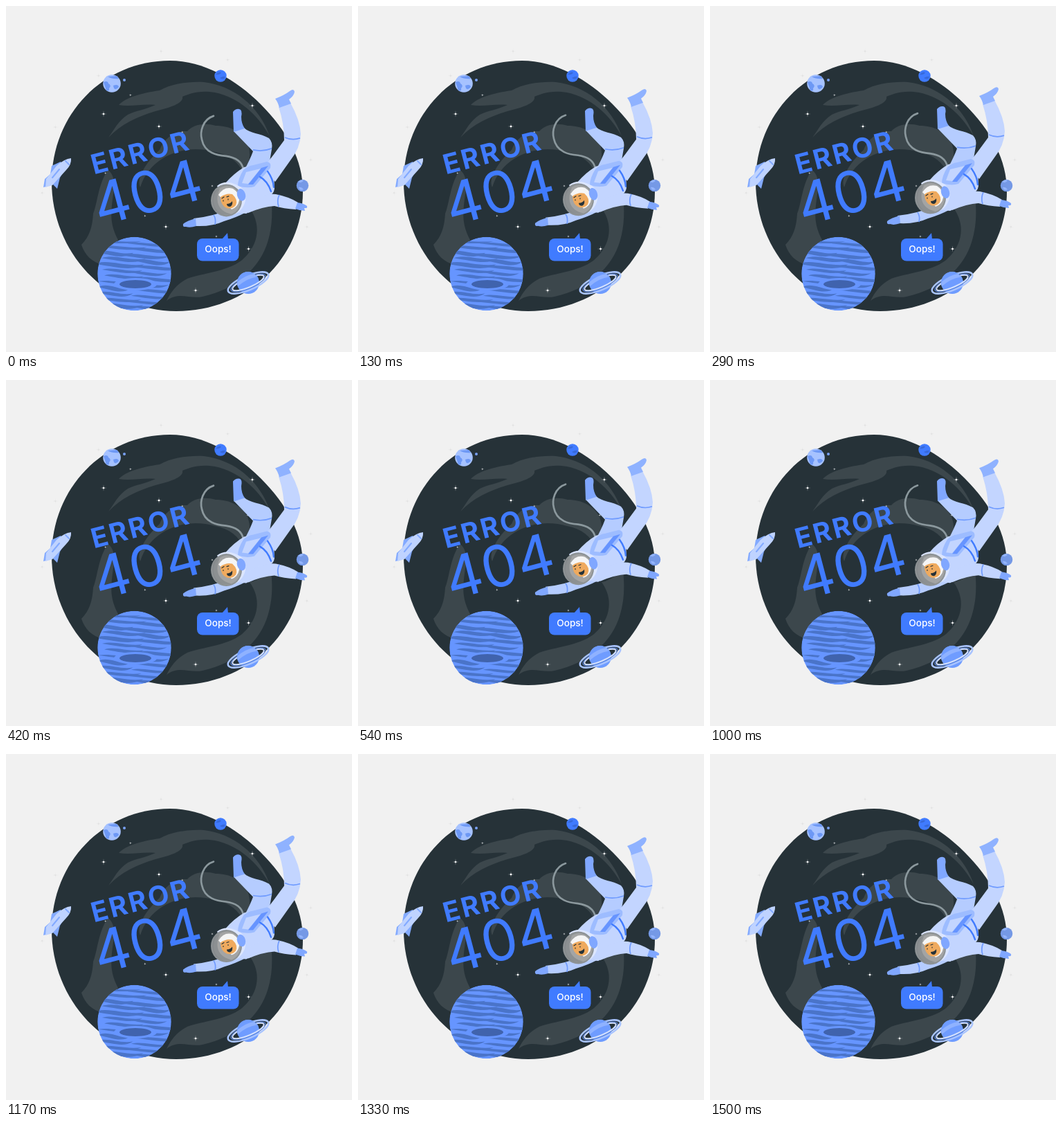
An HTML page that plays this animation: 500x500 px, repeating every 1.54 s.

```html
<!DOCTYPE html>
<html lang="en">
<head>
<meta charset="utf-8">
<title>Error 404</title>
<style>
  html, body { margin: 0; width: 100%; height: 100%; overflow: hidden; background: #f1f1f1; }
  svg { display: block; width: 100%; height: 100%; }
  text { font-family: Inter, "Open Sans", sans-serif; }
  .line { fill: none; stroke-linecap: round; }
  .cuff { fill: none; stroke: #6f9bff; stroke-width: 1.7; }
  .suit { fill: #c3d5ff; }
  .shade { fill: #b5ccff; }
  .glove { fill: #80a7ff; }
</style>
</head>
<body>
<svg viewBox="0 0 500 500">
  <defs>
    <clipPath id="globe"><circle cx="185.5" cy="387" r="53.3"/></clipPath>
  </defs>

  <!-- sky -->
  <path fill="#263238" d="M237 79C285 79 332 106 368 142C406 180 429 222 429 268C429 365 348 441 246 441C144 441 66 355 66 254C66 157 140 79 237 79Z"/>
  <g fill="#3c474c">
    <path d="M148 190C157 178 161 167 176 157C188 151 201 150 216 143C198 141 180 146 163 143C172 133 194 126 222 122C240 112 264 109 286 110C328 115 366 144 381 188C364 157 336 132 302 125C279 121 264 127 255 131C257 141 236 147 216 152C190 160 167 170 148 190Z"/>
    <path d="M222 208C229 190 245 180 262 181C270 172 285 168 303 173C324 173 341 182 349 198C355 213 352 231 343 242C337 226 323 215 302 211C260 198 208 216 194 262C188 250 201 227 222 208Z"/>
    <path d="M147 237C154 241 159 253 155 272C151 300 150 315 162 338L140 374C124 370 114 360 109 345C121 333 125 318 126 300C132 286 133 258 147 237Z"/>
    <path d="M352 292C372 320 362 350 340 368C318 384 284 386 262 394C246 402 238 414 232 426C250 412 265 424 284 420C310 414 330 404 345 390C378 364 390 320 382 268C376 280 366 290 352 292Z"/>
  </g>
  <g id="stars"></g>

  <g fill="#407bff">
    <text transform="translate(127 243.5) rotate(-14.5)" font-size="39.5" font-weight="700" letter-spacing="2.9">ERROR</text>
    <text transform="translate(134.5 318) rotate(-14.8)" font-size="83" font-weight="400">404</text>
  </g>

  <!-- planets -->
  <g clip-path="url(#globe)">
    <circle cx="185.5" cy="387" r="53.3" fill="#6695ff"/>
    <g id="bands" fill="#4a74c9"></g>
    <ellipse cx="187" cy="402" rx="31" ry="9" fill="#6695ff"/>
    <ellipse cx="187" cy="402" rx="23" ry="6" fill="#4063ad"/>
  </g>
  <circle cx="153" cy="112" r="12.8" fill="#a6c2ff"/>
  <path fill="#6d98f5" d="M147 102Q154 106 163 105L160 101ZM141 110Q147 107 148 112Q153 115 149 119Q150 124 145 122ZM155 115Q162 112 163 117Q159 122 156 119Z"/>
  <circle cx="171" cy="107" r="2" fill="#79a1f7"/>
  <circle cx="310" cy="101" r="8.7" fill="#407bff"/>
  <path fill="#3769d9" d="M303 99q4-5 8-3q-2 4-8 3ZM309 104q5-3 8-2q-2 6-8 2Z"/>
  <circle cx="428.5" cy="259.5" r="8.7" fill="#7599e6"/>
  <path fill="#94b5fc" d="M422 254q4-4 8-2q-3 5-8 2ZM423 262q4-1 7 3q-5 3-7-3Z"/>
  <g transform="translate(350 400) rotate(-23)">
    <circle r="16" fill="#6f9cff"/>
    <g class="line">
      <ellipse rx="31.5" ry="10.5" stroke="#a9c4ff" stroke-width="2.6"/>
      <ellipse rx="27" ry="8" stroke="#5580d8" stroke-width="1.2"/>
      <ellipse rx="24.5" ry="6.5" stroke="#d3e0ff" stroke-width="2"/>
    </g>
    <path fill="#6f9cff" d="M-16 0A16 16 0 0 1 16 0Q0 6-16 0Z"/>
    <path fill="#8fb2ff" d="M-14-7Q0-12 13-9L15-3Q0-7-16-1Z"/>
  </g>

  <!-- shuttle -->
  <path fill="#83aaff" d="M66 231L79 225L85 236L78 248L74 264L68 258L54 262L56 250L64 243Z"/>
  <path fill="#bfd3ff" d="M94 220Q95 229 87 237L67 259L57 262L58 250L73 231Q84 221 94 220Z"/>
  <path class="line" stroke="#83aaff" stroke-width="2" d="M67 248L77 236M86 224L91 229"/>

  <!-- speech bubble -->
  <path fill="#407bff" d="M312 337L320 328L321 337Z"/>
  <rect x="276" y="336" width="60.5" height="32.5" rx="8" fill="#407bff"/>
  <text x="306.5" y="356" font-size="13.6" font-weight="450" text-anchor="middle" fill="#fff">Oops!</text>

  <g id="astronaut">
    <path class="shade" d="M329 181L344 176C352 184 368 184 380 191Q386 197 384 207L379 236L345 236Q353 221 357 210Z"/>
    <path class="glove" d="M328 153Q332 148 337 149Q342 150 340 160Q340 170 345 177L329 182Z"/>
    <path class="cuff" d="M357 208Q371 211 384 206"/>
    <path class="suit" d="M394 146L411 140Q425 165 426 185Q425 206 411 223L389 254L371 235Q387 215 402 194Q402 170 394 146Z"/>
    <path fill="#8fb2ff" d="M389 134Q402 129 410 123Q416 119 417 124Q416 130 409 135L412 141L395 147Q393 139 389 134Z"/>
    <path class="cuff" d="M403 190Q414 195 425 191"/>

    <path class="line" stroke="#8b989d" stroke-width="2.7" d="M300 159C284 164 280 182 283 193C287 213 306 216 318 217C333 219 341 226 343 236"/>

    <path class="shade" d="M325 293Q300 304 271 307L274 318Q298 319 315 311Q332 306 347 298Z"/>
    <path class="glove" d="M274 307Q262 310 256 315Q255 320 260 319Q266 321 275 318Z"/>
    <path class="cuff" d="M300 302Q304 308 302 316"/>

    <path class="suit" d="M317 256Q329 242 344 233L380 225Q388 240 388 264Q387 272 379 275Q368 292 347 300L328 298Z"/>
    <path class="suit" d="M352 283Q371 270 390 272Q410 276 422 284L419 294Q401 293 388 289Q371 290 350 299Z"/>
    <path class="glove" d="M421 284Q430 285 435 289Q436 293 431 292L432 296Q425 296 418 293Z"/>
    <path class="cuff" d="M395 273Q391 281 394 290"/>

    <path fill="#9dbcff" d="M343 237Q349 231 357 230L377 225Q384 226 382 234L359 261Q348 264 335 260Q335 250 343 237Z"/>
    <path fill="#c3d5ff" d="M347 240L368 235L350 257L341 256Z"/>
    <path fill="#6694ff" d="M369 234L379 231L357 258L350 258Z"/>
    <path class="line" stroke="#407bff" stroke-width="2.4" d="M367 247Q378 253 383 268M378 239Q386 250 387 262"/>

    <!-- helmet -->
    <path fill="#dce6ff" d="M305 260Q317 251 332 258Q348 264 346 281Q342 299 324 303Z"/>
    <ellipse cx="318.5" cy="281" rx="22.5" ry="23.5" fill="#8d9294"/>
    <ellipse cx="319.5" cy="281" rx="19.5" ry="21" fill="#a3a4a4"/>
    <path fill="#f5f5f5" d="M307 273Q315 260 328 264Q338 270 337 281Q335 291 326 294Z"/>
    <path fill="#efaa5e" d="M310 276Q318 270 327 272Q336 280 332 288Q327 294 319 292Q310 288 310 276Z"/>
    <path class="line" stroke="#263238" stroke-width="1.2" d="M312 278l3-2M319 276l3-1M314 281v1M321 279v1"/>
    <path fill="#263238" d="M319 286Q324 286 327 282Q328 288 324 290Q319 290 319 286Z"/>
    <path fill="#83888b" opacity=".7" d="M301 267Q295 285 304 297Q314 304 326 301Q309 297 306 284Q304 275 309 264Z"/>
    <ellipse cx="340" cy="273" rx="6" ry="9" class="glove" transform="rotate(-15 340 273)"/>
  </g>
</svg>
<script>
  const find = id => document.getElementById(id);
  const repeat = (n, make) => Array.from({ length: n }, (_, i) => make(i)).join("");

  let seed = 7;
  const random = (min, max) => {
    seed = seed * 16807 % 2147483647;
    return min + (max - min) * seed / 2147483647;
  };

  // A star is a dot with four faint rays.
  const star = (x, y, r, color) => {
    const ray = r * 2.6, k = r * .3;
    return `<g transform="translate(${x} ${y})" fill="${color}">
      <path opacity=".5" d="M0 ${-ray}L${k} ${-k}L${ray} 0L${k} ${k}L0 ${ray}L${-k} ${k}L${-ray} 0L${-k} ${-k}Z"/>
      <circle r="${r * .75}"/></g>`;
  };
  const polarStar = (angle, radius, r, color) =>
    star(248 + radius * Math.cos(angle), 260 + radius * Math.sin(angle), r, color);

  const bright = [[141, 156], [221, 174], [356, 144], [231, 319], [350.5, 351], [274, 411]];
  find("stars").innerHTML =
    bright.map(([x, y]) => star(x, y, 1.8, "#fff")).join("") +
    repeat(8, i => polarStar(i * 2.4, 50 + 14 * i, 1, "#e4e6e7")) +
    repeat(8, i => polarStar(3.09 + i * .5, 196, 1.5, "#e2e2e2"));

  // Wavy lenses, scattered over evenly spaced rows of the globe.
  const band = i => {
    const y = 341 + i * 4.2, h = random(5, 10), w = random(45, 85);
    const a = (i % 2 ? 212 : 160) + random(-12, 12) - w / 2, b = a + w;
    return `<path d="M${a} ${y - 2}C${a + w * .3} ${y - h} ${a + w * .6} ${y + h * .3} ${b} ${y - 1}
      C${b - w * .25} ${y + h} ${a + w * .4} ${y + h * .2} ${a} ${y - 2}Z"/>`;
  };
  find("bands").innerHTML = repeat(24, band);

  const LOOP = 1540, PEAK = 720, LIFT = 9.5;
  const astronaut = find("astronaut");
  function draw() {
    const phase = (performance.now() % LOOP - PEAK) / LOOP * 2 * Math.PI;
    const y = -LIFT * (1 + Math.cos(phase)) / 2;
    astronaut.setAttribute("transform", `translate(0 ${y.toFixed(2)})`);
    requestAnimationFrame(draw);
  }
  draw();
</script>
</body>
</html>
```
